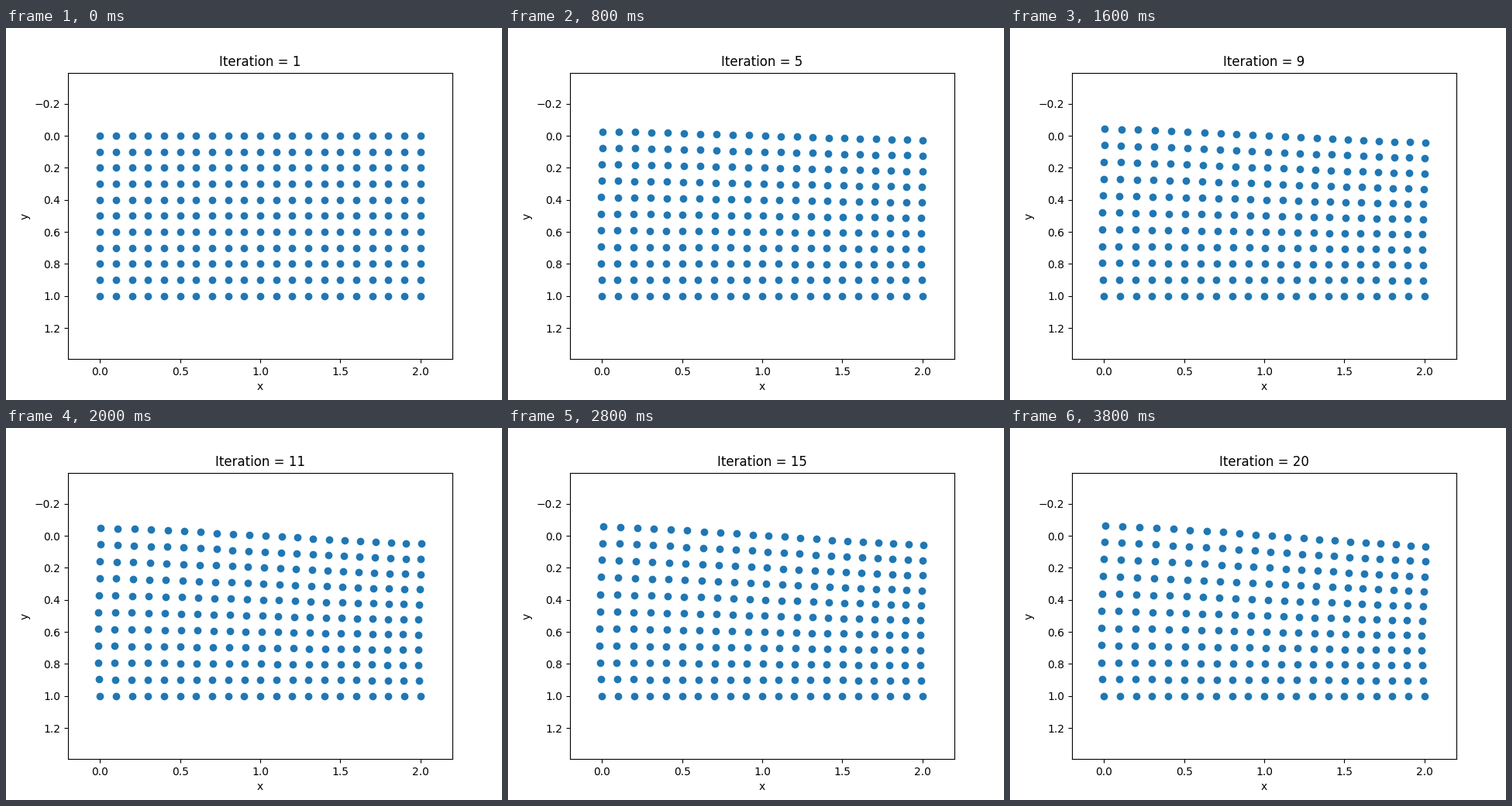
These frames come from a looping animation (640 px wide and 480 px high, 4000 ms). A matplotlib script:

```python
import matplotlib.pyplot as plt
import numpy as np
from matplotlib.animation import FuncAnimation

FRAMES = 20
INTERVAL = 200
PX_PER_UNIT = 496 / 2.4

# Regular grid on a 2 x 1 block, clamped along y = 1
X, Y = np.meshgrid(np.linspace(0, 2, 21), np.linspace(0, 1, 11))
T = X - 1   # offset from the vertical centre line
S = 1 - Y   # height above the clamped edge


def cubic(a, b, c):
    return (a * S + b * S**2 + c * S**3) / PX_PER_UNIT


# Displacements at the end of the run
mid_u = cubic(6.0, 3.7, 0)
side_u = cubic(-24.1, 47.8, -22.2)
side_v = cubic(6.1, 19.4, -12.0)
bulge = np.abs(T) ** (2 + 1.2 * Y**4)
slope = 1.15 * T - 0.15 * T**3


def relax(n, tau):
    """Exponential approach, scaled to reach 1 on the last step."""
    return (1 - np.exp(-n / tau)) / (1 - np.exp(-(FRAMES - 1) / tau))


def positions(n):
    mid = mid_u * relax(n, 11.5)
    side = side_u * relax(n, 9)
    u = mid + (side - mid) * bulge
    v = side_v * slope * relax(n, 9)
    return (X + u).ravel(), (Y + v).ravel()


fig, ax = plt.subplots(figsize=(6.4, 4.8), dpi=100)
half = 1.2 * 369.6 / 496
ax.set_xlim(-0.2, 2.2)
ax.set_ylim(0.5 + half, 0.5 - half)
ax.set_xlabel("x")
ax.set_ylabel("y")
title = ax.set_title("Iteration = 1")
dots, = ax.plot(*positions(0), "o", color="#1f77b4")


def update(n):
    dots.set_data(*positions(n))
    title.set_text(f"Iteration = {n + 1}")
    return dots, title


anim = FuncAnimation(fig, update, frames=FRAMES, interval=INTERVAL,
                     repeat=True, repeat_delay=0, blit=False)
plt.show()
```
